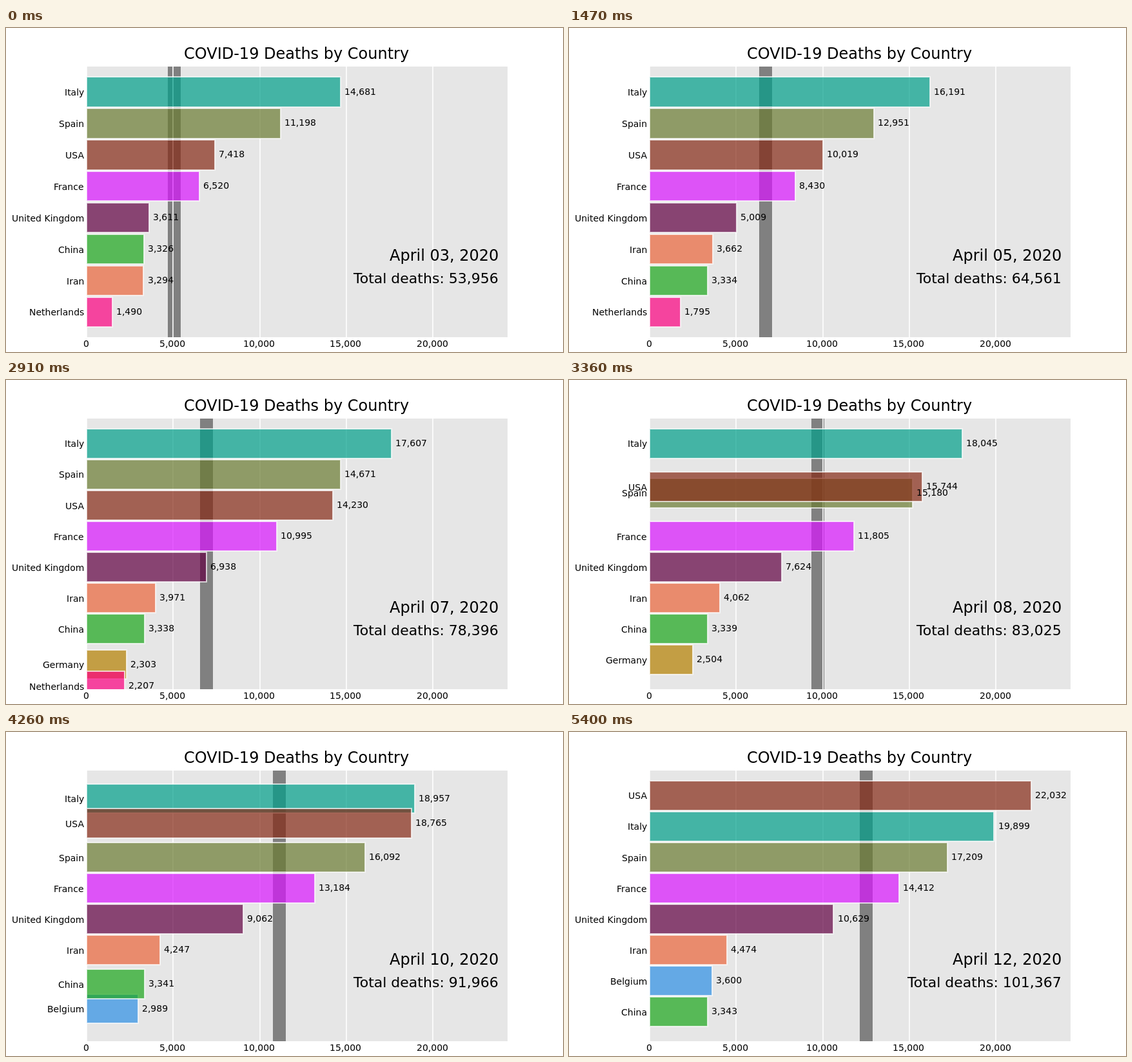
Animation of 864x504 px, one loop 5430 ms. Source, as an HTML page with a canvas:

```html
<!DOCTYPE html>
<html lang="en">
<head>
<meta charset="utf-8">
<title>COVID-19 Deaths by Country</title>
<style>
  html, body { margin: 0; width: 864px; height: 504px; overflow: hidden; background: #fff; }
  canvas { display: block; }
</style>
</head>
<body>
<canvas id="stage" width="864" height="504"></canvas>
<script>
const ctx = document.getElementById('stage').getContext('2d');

const BARS = 8, STEPS = 20, STEP_MS = 30, LAST_DAY = 9;
const TOTAL_STEPS = LAST_DAY * STEPS + 1;
const LEFT = 125, RIGHT = 778, TOP = 60, BOTTOM = 481;

// Each curve runs through five key days; later countries are painted on top.
const KEY_DAYS = [0, 3, 6, 8, 9];
const countries = [
  ['Belgium', '#2e91e5', 1143, 1632, 2523, 3346, 3600],
  ['China', '#1ca71c', 3326, 3335, 3339, 3343, 3343],
  ['France', '#da16ff', 6520, 8926, 12228, 13851, 14412],
  ['Germany', '#b68100', 1275, 1765, 2607, 2894, 3022],
  ['Iran', '#eb663b', 3294, 3739, 4110, 4357, 4474],
  ['Italy', '#00a08b', 14681, 16523, 18279, 19468, 19899],
  ['Netherlands', '#fc0080', 1490, 1874, 2403, 2653, 2747],
  ['Spain', '#6c7c32', 11198, 13341, 15447, 16606, 17209],
  ['USA', '#862a16', 7418, 10783, 16553, 20471, 22032],
  ['United Kingdom', '#620042', 3611, 5385, 7993, 9892, 10629],
].map(([name, color, ...keys]) => ({
  name, color,
  deaths: Array.from({ length: LAST_DAY + 1 }, (_, day) => Math.round(curve(keys, day))),
}));

// Parabola through the key points mid - 1, mid and mid + 1.
function parabola(keys, mid, day) {
  const near = [mid - 1, mid, mid + 1];
  return near.reduce((sum, i) => sum + near.filter(j => j !== i).reduce((term, j) =>
    term * (day - KEY_DAYS[j]) / (KEY_DAYS[i] - KEY_DAYS[j]), keys[i]), 0);
}

// Smooth curve: neighbouring parabolas blended across each span.
function curve(keys, day) {
  const last = KEY_DAYS.length - 1;
  const k = Math.min(last - 1, KEY_DAYS.findLastIndex(x => x <= day));
  const t = (day - KEY_DAYS[k]) / (KEY_DAYS[k + 1] - KEY_DAYS[k]);
  const a = parabola(keys, Math.max(1, k), day);
  const b = parabola(keys, Math.min(last - 1, k + 1), day);
  return a + (b - a) * t;
}

// Slot 8 is the top row; everything outside the leading eight waits at 0.
for (const c of countries) {
  c.slots = c.deaths.map((v, day) =>
    Math.max(0, BARS - countries.filter(o => o.deaths[day] > v).length));
}

const xOf = v => LEFT + v * 0.02686;
const format = v => Math.round(v).toLocaleString('en-US');

function median(list) {
  const s = [...list].sort((a, b) => a - b), n = s.length;
  return (s[(n - 1) >> 1] + s[n >> 1]) / 2;
}

// anchor: 0 = left, 0.5 = centre, 1 = right; text sits on whole pixels.
function text(str, x, y, size, anchor) {
  ctx.font = size + 'px "DejaVu Sans", sans-serif';
  ctx.fillText(str, Math.round(x - ctx.measureText(str).width * anchor), Math.round(y));
}

function draw(step) {
  const day = Math.floor(step / STEPS), part = step % STEPS / STEPS;
  const at = list => list[day] + (list[Math.min(day + 1, LAST_DAY)] - list[day]) * part;

  // The axis grows downwards once a ninth bar has entered from below.
  const low = step > 4 * STEPS ? 0.05 : 0.2;
  const unit = 420.6 / (BARS + 0.8 - low);
  const yOf = slot => 60.35 + (BARS + 0.8 - slot) * unit;

  const all = countries.map(c => ({ ...c, value: at(c.deaths), slot: at(c.slots) }));
  const bars = all.filter(b => b.slot > 0);
  const total = all.reduce((sum, b) => sum + b.value, 0);

  ctx.fillStyle = '#fff';
  ctx.fillRect(0, 0, 864, 504);

  ctx.save();
  ctx.beginPath();
  ctx.rect(LEFT, TOP, RIGHT - LEFT, BOTTOM - TOP);
  ctx.clip();
  ctx.fillStyle = '#e6e6e6';
  ctx.fillRect(LEFT, TOP, RIGHT - LEFT, BOTTOM - TOP);
  ctx.fillStyle = '#808080';
  ctx.fillRect(Math.round(xOf(median(bars.map(b => b.value)))) - 10, TOP, 20, BOTTOM - TOP);
  ctx.fillStyle = ctx.strokeStyle = '#fff';
  for (let v = 0; v <= 20000; v += 5000) {
    ctx.fillRect(Math.round(xOf(v)) - 0.8, TOP, 1.6, BOTTOM - TOP);
  }
  ctx.globalAlpha = 0.7;
  ctx.lineWidth = 2;
  for (const b of bars) {
    const top = Math.round(yOf(b.slot + 0.475)), bottom = Math.round(yOf(b.slot - 0.475));
    const box = [LEFT, top, Math.round(xOf(b.value)) - LEFT, bottom - top];
    ctx.fillStyle = b.color;
    ctx.fillRect(...box);
    ctx.strokeRect(...box);
  }
  ctx.restore();

  ctx.fillStyle = '#000';
  text('COVID-19 Deaths by Country', 451, 48, 24, 0.5);
  for (let v = 0; v <= 20000; v += 5000) text(format(v), xOf(v) - 1, 496, 14, 0.5);
  for (const b of bars) {
    const y = yOf(b.slot);
    text(b.name, 121, y + 5.6, 14, 1);
    text(format(b.value), xOf(b.value) + 6.03, y + 4.1, 14, 0);
  }
  text(`April ${String(3 + day).padStart(2, '0')}, 2020`, 764, 362, 24, 1);
  text('Total deaths: ' + format(total), 764, 397, 22, 1);
}

function tick() {
  draw(Math.floor(performance.now() / STEP_MS) % TOTAL_STEPS);
  requestAnimationFrame(tick);
}
tick();
</script>
</body>
</html>
```
